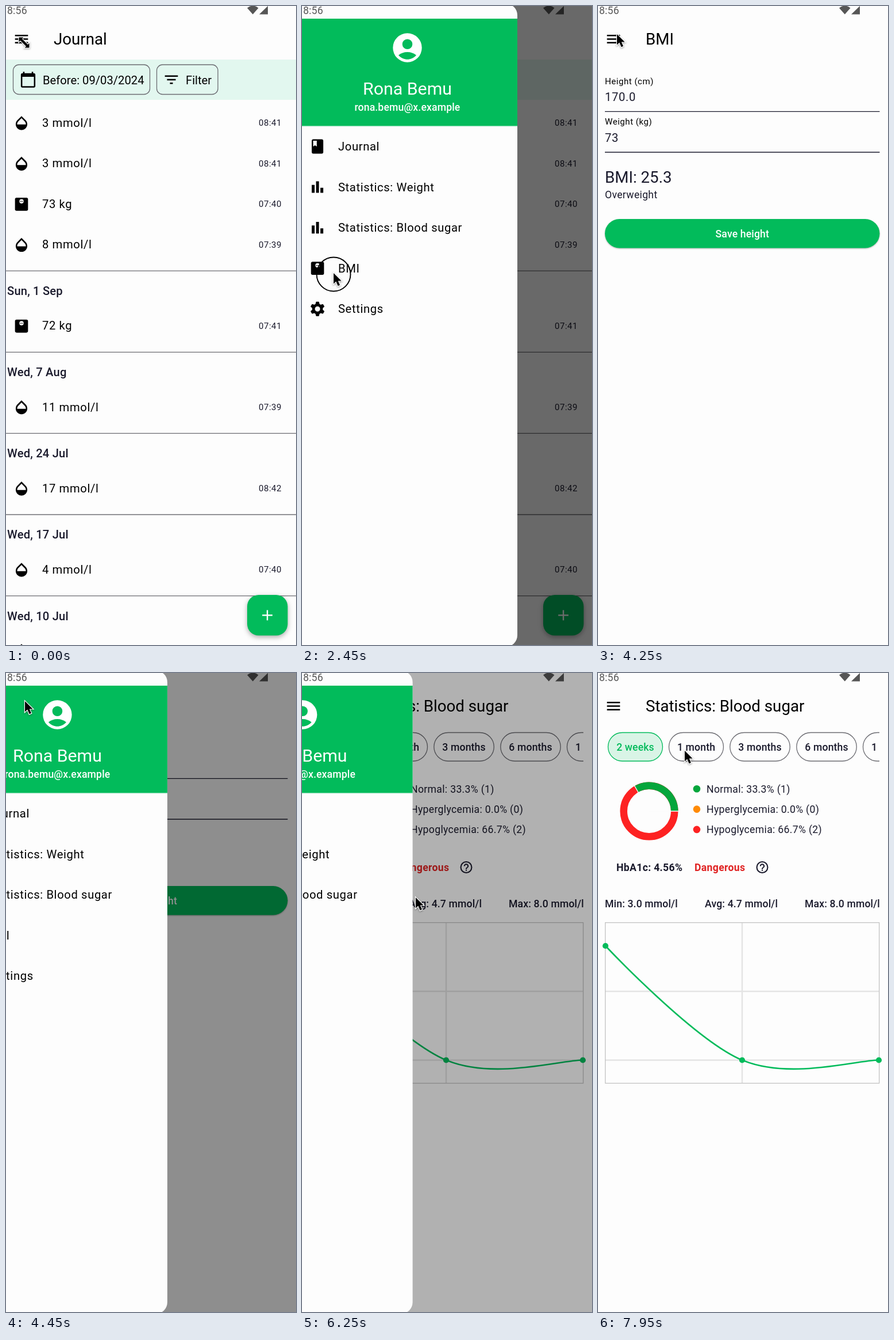
Recreate the animation shown at these times as an HTML page. Size 505 by 1110 pixels, loop 8 s.

```html
<!DOCTYPE html>
<html lang="en">
<head>
<meta charset="utf-8">
<title>Health journal</title>
<style>
  html, body { margin: 0; width: 505px; height: 1110px; overflow: hidden; background: #fdfdfd; }
  svg { display: block; font-family: Roboto, sans-serif; }
  .lift { filter: drop-shadow(0 3px 4px rgba(0, 0, 0, .32)); }
  .low { filter: drop-shadow(0 1px 1px rgba(0, 0, 0, .3)); }
  .cursor { filter: drop-shadow(0 1.5px 1.5px rgba(0, 0, 0, .4)); }
  .soft { filter: blur(5px); }
</style>
</head>
<body>
<svg id="stage" width="505" height="1110" viewBox="0 0 505 1110"></svg>
<script>
const GREEN = '#02bb5b', INK = '#1a1a2c', PAPER = '#fdfdfd', GREY = '#6c6c72';
const LOOP = 8000, STEP = 50, DRAWER = 375;

const ICONS = {
  menu: 'M3 18h18v-2H3zM3 13h18v-2H3zM3 8h18V6H3z',
  filter: 'M10 18h4v-2h-4zM3 6v2h18V6zM6 13h12v-2H6z',
  calendar: 'M20 3h-1V1h-2v2H7V1H5v2H4c-1.1 0-2 .9-2 2v16c0 1.1.9 2 2 2h16c1.1 0 2-.9 2-2V5c0-1.1-.9-2-2-2zm0 18H4V8h16z',
  drop: 'M17.66 8L12 2.35 6.34 8C4.78 9.56 4 11.64 4 13.64s.78 4.11 2.34 5.67 3.61 2.35 5.66 2.35 4.1-.79 5.66-2.35S20 15.64 20 13.64 19.22 9.56 17.66 8zM6 14c.01-2 .62-3.27 1.76-4.4L12 5.27l4.24 4.38C17.38 10.77 17.99 12 18 14z',
  scale: 'M19 3H5c-1.1 0-2 .9-2 2v14c0 1.1.9 2 2 2h14c1.1 0 2-.9 2-2V5c0-1.1-.9-2-2-2zM12 11a3 3 0 110-6 3 3 0 010 6zM10 7.5h1v1h-1zM11.5 7.5h1v1h-1zM13 7.5h1v1h-1z',
  book: 'M18 2H6c-1.1 0-2 .9-2 2v16c0 1.1.9 2 2 2h12c1.1 0 2-.9 2-2V4c0-1.1-.9-2-2-2zM6 4h5v8l-2.5-1.5L6 12z',
  bars: 'M4 9h4v11H4zM16 13h4v7h-4zM10 4h4v16h-4z',
  help: 'M11 18h2v-2h-2zM12 2a10 10 0 100 20 10 10 0 000-20zm0 18a8 8 0 110-16 8 8 0 010 16zm0-14c-2.21 0-4 1.79-4 4h2c0-1.1.9-2 2-2s2 .9 2 2c0 2-3 1.75-3 5h2c0-2.25 3-2.5 3-5 0-2.21-1.79-4-4-4z',
  person: 'M12 2a10 10 0 100 20 10 10 0 000-20zm0 4a3.5 3.5 0 110 7 3.5 3.5 0 010-7zm0 14c-2.03 0-4.43-.82-6.14-2.88C7.55 15.8 9.68 15 12 15s4.45.8 6.14 2.12C16.43 19.18 14.03 20 12 20z'
};

// Text styles: size, letter spacing, weight, colour
const TYPE = {
  title: [27.7, 0, 400, '#000'],
  item: [20.2, .63, 400, '#000'],
  field: [20.2, .63, 400, INK],
  chip: [20.2, 0, 400, '#000'],
  day: [20.2, .19, 500, INK],
  small: [15.1, .5, 400, INK],
  label: [15.1, .5, 400, '#000'],
  body: [17.65, .315, 400, INK],
  strong: [17.65, .126, 500, INK],
  bold: [17.65, .315, 700, INK],
  name: [30.3, 0, 400, '#fff'],
  mail: [17.65, .126, 500, '#fff']
};

// y is the middle of the capitals
function text(str, x, y, style, anchor = 'start', color) {
  const [size, gap, weight, ink] = TYPE[style];
  return `<text x="${x}" y="${y + size * .355}" font-size="${size}" letter-spacing="${gap}" font-weight="${weight}" fill="${color || ink}" text-anchor="${anchor}">${str}</text>`;
}
const rect = (x, y, w, h, fill, more = '') =>
  `<rect x="${x}" y="${y}" width="${w}" height="${h}" fill="${fill}" ${more}/>`;
const line = (x1, y1, x2, y2, color, width = 1.3) =>
  `<path d="M${x1} ${y1}L${x2} ${y2}" stroke="${color}" stroke-width="${width}"/>`;
const dot = (x, y, r, fill) => `<circle cx="${x}" cy="${y}" r="${r}" fill="${fill}"/>`;
const at = (cx, cy, size) => `translate(${cx - size / 2} ${cy - size / 2}) scale(${size / 24})`;
const icon = (name, cx, cy, size = 30.2, fill = '#000') =>
  `<path d="${ICONS[name]}" transform="${at(cx, cy, size)}" fill="${fill}" fill-rule="evenodd"/>`;
const group = (id, body, more = '') => `<g id="${id}" ${more}>${body}</g>`;

function gear(cx, cy) {
  let teeth = '';
  for (let a = 0; a < 360; a += 60)
    teeth += `<path d="M9.3 6.5L10.2 2.4h3.6l.9 4.1z" stroke="#000" stroke-width=".7" stroke-linejoin="round" transform="rotate(${a} 12 12)"/>`;
  return `<g transform="${at(cx, cy, 30.2)}">${teeth}<circle cx="12" cy="12" r="5.5" fill="none" stroke="#000" stroke-width="3.8"/></g>`;
}

function journalPage() {
  const entry = (kind, value, time, row) => {
    const y = 202.5 + 70.55 * row;
    return icon(kind, 27, y + .8) + text(value, 63, y, 'item') + text(time, 440, y + .5, 'small');
  };
  const days = [
    ['Sun, 1 Sep', 'scale', '72 kg', '07:41'],
    ['Wed, 7 Aug', 'drop', '11 mmol/l', '07:39'],
    ['Wed, 24 Jul', 'drop', '17 mmol/l', '08:42'],
    ['Wed, 17 Jul', 'drop', '4 mmol/l', '07:40'],
    ['Wed, 10 Jul', 'drop', '6 mmol/l', '07:40']
  ];
  const chip = (x, w) => rect(x, 102, w, 51.5, 'none', `rx="10" stroke="${GREY}" stroke-width="1.3"`);
  let out = icon('menu', 27, 57.5) + text('Journal', 83, 57, 'title')
    + rect(0, 93, 505, 70, '#e2f7ef')
    + chip(12.5, 238) + icon('calendar', 38.5, 128) + text('Before: 09/03/2024', 64, 128.5, 'chip')
    + chip(262.5, 106.5) + icon('filter', 288, 128) + text('Filter', 313, 128.5, 'chip')
    + entry('drop', '3 mmol/l', '08:41', 0) + entry('drop', '3 mmol/l', '08:41', 1)
    + entry('scale', '73 kg', '07:40', 2) + entry('drop', '8 mmol/l', '07:39', 3);
  days.forEach(([day, ...rest], i) => {
    out += line(0, 460.2 + 141.1 * i, 505, 460.2 + 141.1 * i, GREY)
      + text(day, 2, 495 + 141.1 * i, 'day') + entry(...rest, 5 + 2 * i);
  });
  return out + rect(420, 1023, 70.5, 70.5, GREEN, 'rx="20" class="lift"')
    + line(446.2, 1058.3, 464, 1058.3, '#fff', 2.4) + line(455.1, 1049.4, 455.1, 1067.2, '#fff', 2.4);
}

function bmiPage() {
  return icon('menu', 27, 57.5) + text('BMI', 83, 57, 'title')
    + text('Height (cm)', 12, 130.5, 'label') + text('170.0', 12, 158, 'field') + line(12, 183.3, 490.5, 183.3, INK)
    + text('Weight (kg)', 12, 201, 'label') + text('73', 12, 228.5, 'field') + line(12, 254, 490.5, 254, INK)
    + text('BMI: 25.3', 12, 297, 'title', 'start', INK) + text('Overweight', 12, 327.5, 'body')
    + rect(12, 370, 478.5, 50.5, GREEN, 'rx="25.2" class="low"')
    + text('Save height', 251.3, 395.5, 'strong', 'middle', '#fff');
}

function statsPage() {
  const chip = (label, x, w, on) =>
    rect(x, 103.5, w, 49.5, on ? '#d9f4e6' : 'none', `rx="24.7" stroke="${on ? GREEN : GREY}" stroke-width="1.3"`)
    + text(label, x + w / 2, 128.5, 'strong', 'middle', on ? GREEN : INK);
  const chips = chip('2 weeks', 17.5, 95, true) + chip('1 month', 123.5, 95) + chip('3 months', 229.8, 104.5)
    + chip('6 months', 345.8, 104.5) + chip('1 year', 461.5, 78);
  const legend = [['Normal: 33.3% (1)', '#05a63c'], ['Hyperglycemia: 0.0% (0)', '#ff8a05'], ['Hypoglycemia: 66.7% (2)', '#fd2222']]
    .map(([label, color], i) => dot(172, 201.3 + 35.3 * i, 6.3, color) + text(label, 189, 201.5 + 35.3 * i, 'body')).join('');
  const ring = `<g transform="translate(89 240)" fill="none" stroke-width="12.6">
      <circle r="44.3" stroke="#fd2222"/>
      <path d="M44.3 0A44.3 44.3 0 0 0 -22.15 -38.36" stroke="#05a63c"/></g>`
    + line(89, 240, 141, 240, PAPER, 1.4) + line(89, 240, 63, 195, PAPER, 1.4);
  const chart = line(251, 434, 251, 712, '#e4e4e4', 2.5) + line(13, 553, 489, 553, '#e4e4e4', 2.5)
    + line(13, 672.5, 489, 672.5, '#e4e4e4', 2.5)
    + rect(12.7, 433.6, 477, 279, 'none', 'stroke="#c3c3c3" stroke-width="1.3"')
    + `<path d="M13 474C13 474 167.7 637.8 251 672.5S447.4 672.5 489 672.5" fill="none" stroke="${GREEN}" stroke-width="2.6"/>`
    + dot(13, 474, 5.1, GREEN) + dot(251, 672.5, 5.1, GREEN) + dot(489, 672.5, 5.1, GREEN);
  return icon('menu', 27, 57.5) + text('Statistics: Blood sugar', 83, 57, 'title')
    + `<g clip-path="url(#chipClip)">${chips}</g>` + ring + legend
    + text('HbA1c: 4.56%', 32, 337.5, 'bold') + text('Dangerous', 168, 337.5, 'bold', 'start', '#e02424')
    + icon('help', 286, 337.5, 25.2, INK)
    + text('Min: 3.0 mmol/l', 12, 401, 'strong') + text('Avg: 4.7 mmol/l', 186, 401, 'strong')
    + text('Max: 8.0 mmol/l', 360, 401, 'strong') + chart;
}

function drawerPanel() {
  const items = ['Journal', 'Statistics: Weight', 'Statistics: Blood sugar', 'BMI', 'Settings'];
  const marks = ['book', 'bars', 'bars', 'scale'];
  return rect(-40, -4, DRAWER + 40, 1117, PAPER, 'rx="20"')
    + '<g id="rippleRow"><circle id="ripple" class="soft"/></g>'
    + rect(0, 22, DRAWER, 186.5, GREEN) + rect(0, 208.3, DRAWER, 1, '#9fe3c0')
    + icon('person', 183.5, 72.5, 60.5, '#fff')
    + text('Rona Bemu', 183.5, 143, 'name', 'middle') + text('rona.bemu@x.example', 183.5, 176, 'mail', 'middle')
    + items.map((label, i) => {
      const y = 244 + 70.55 * i;
      return (marks[i] ? icon(marks[i], 27, y) : gear(27, y)) + text(label, 63, y, 'item');
    }).join('');
}

const status = `<g fill="#000" fill-opacity=".66"><text x="2" y="14" font-size="17.6" letter-spacing=".2">8:56</text>
  <path d="M420 3.5Q430-4.500 439.500 3.500L429.800 14.500zM456 0V14.500H441z"/></g>`;
const cursors = `<circle id="click" r="29.500" fill="none" stroke="#000" stroke-width="1.9"/>
  <path id="resize" class="cursor" d="M-9-9H-1L-3.500-6.500 6.500 3.500 9 1V9H1L3.500 6.500-6.500-3.500-9-1Z" transform="translate(31.500 63.500)" stroke="#fff" stroke-width="2.400" paint-order="stroke"/>
  <path id="arrow" class="cursor" d="M0 0V18.500L4.300 14.600 7.600 22.300 11 20.800 7.800 13.400H13.600Z" stroke="#fff" stroke-width="2.400" paint-order="stroke"/>`;

document.getElementById('stage').innerHTML =
  `<defs><clipPath id="chipClip">${rect(0, 95, 490, 70, '#000')}</clipPath></defs>`
  + rect(0, 0, 505, 1110, PAPER)
  + group('journal', journalPage()) + group('bmi', bmiPage()) + group('stats', statsPage())
  + rect(0, 0, 505, 1110, '#000', 'id="scrim"') + group('drawer', drawerPanel()) + status + cursors;

const $ = id => document.getElementById(id);
const show = (id, on) => { $(id).style.display = on ? '' : 'none'; };
const set = (id, attrs) => { for (const k in attrs) $(id).setAttribute(k, attrs[k]); };

// Pointer tip: time, x, y
const PATH = [
  [500, 22, 54], [900, 105, 190], [1400, 150, 320], [1900, 115, 430], [2350, 55, 464],
  [2900, 55, 464], [3450, 266, 376], [4050, 33, 49], [4650, 33, 49], [5200, 242, 380],
  [5250, 238, 382], [5500, 228, 406], [5850, 198, 390], [6650, 198, 390],
  [7150, 344, 258], [7350, 344, 258], [7900, 151, 135]
];
// Drawer moves: start, opening or closing
const SLIDES = [[40, true], [2650, false], [4330, true], [6177, false]];
const CLICKS = [[2400, 2550], [4100, 4250], [5850, 6000]];
// Pressed menu rows: time, x, y, row middle
const PRESSES = [[2500, 55, 464, 455.600], [6050, 197, 390, 385]];

function pointer(t) {
  const i = PATH.findIndex(p => p[0] > t);
  if (i === 0) return PATH[0].slice(1);
  if (i < 0) return PATH[PATH.length - 1].slice(1);
  const [a, ax, ay] = PATH[i - 1], [b, bx, by] = PATH[i];
  const u = (t - a) / (b - a), e = u * u * (3 - 2 * u);
  return [ax + (bx - ax) * e, ay + (by - ay) * e];
}

// Critically damped spring
function opening(t) {
  const last = SLIDES.filter(s => s[0] <= t).pop();
  if (!last) return 0;
  const u = (t - last[0]) * .0224, rest = (1 + u) * Math.exp(-u);
  return last[1] ? 1 - rest : rest;
}

function render(t) {
  const open = opening(t), [x, y] = pointer(t);
  show('journal', t < 2650);
  show('bmi', t >= 2650 && t < 6177);
  show('stats', t >= 6177);
  set('scrim', { opacity: .585 * open });
  set('drawer', { transform: `translate(${(open - 1) * DRAWER} 0)` });
  show('drawer', open > .001);

  const press = PRESSES.find(p => t >= p[0] && t < p[0] + 500);
  show('ripple', press);
  if (press) {
    const [start, px, py, mid] = press;
    set('ripple', { cx: px, cy: py, r: 12 + Math.min(30, (t - start) * .09), fill: '#000', 'fill-opacity': .1 });
    $('rippleRow').style.clipPath = `polygon(0 ${mid - 35}px, 375px ${mid - 35}px, 375px ${mid + 35}px, 0 ${mid + 35}px)`;
    $('rippleRow').style.transformBox = 'view-box';
  }
  show('click', CLICKS.some(([a, b]) => t >= a && t < b));
  set('click', { cx: x, cy: y + 2 });
  show('resize', t < 500);
  show('arrow', t >= 500);
  set('arrow', { transform: `translate(${x} ${y})` });
}

const begin = performance.now();
function tick() {
  const t = (performance.now() - begin) % LOOP;
  render(Math.floor(t / STEP) * STEP);
  requestAnimationFrame(tick);
}
tick();
</script>
</body>
</html>
```
